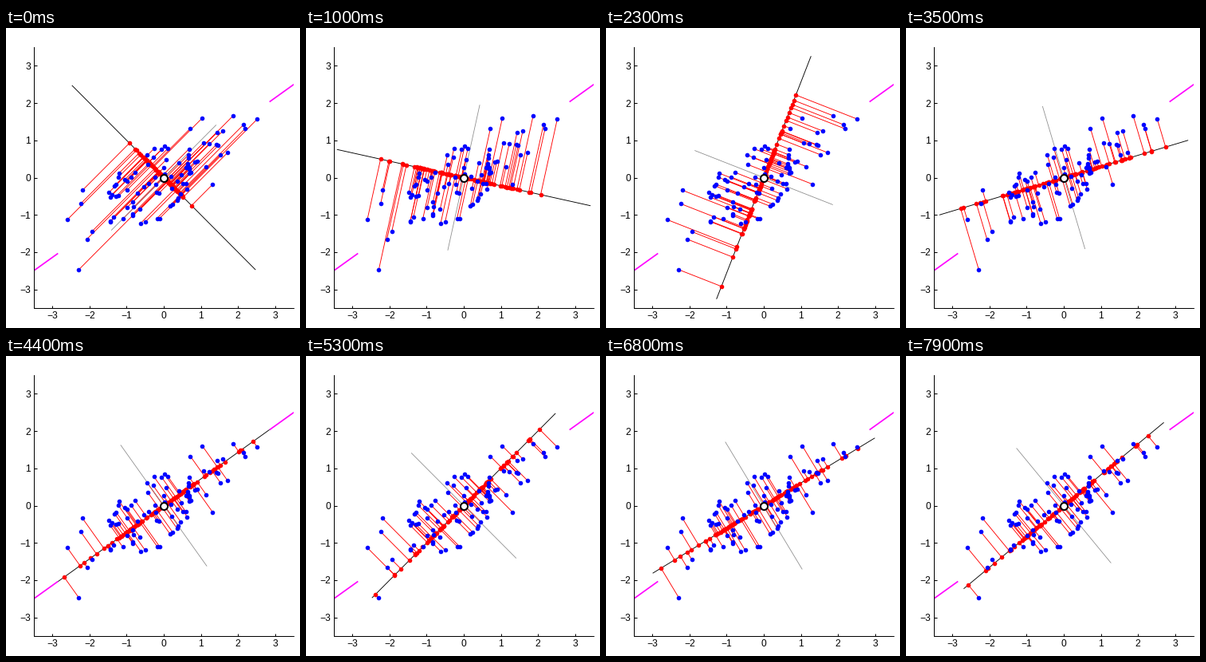
A matplotlib script that plays this animation: 369 by 376 pixels, repeating every 8000 ms.

```python
import numpy as np
import matplotlib.pyplot as plt
from matplotlib.animation import FuncAnimation
from matplotlib.collections import LineCollection

W, H, DPI = 369, 376, 100
FRAMES, STEP_MS = 80, 100
REST, START = 35.5, -45.0      # principal axis and starting angle, degrees
PULL, DAMP = 1.52, 0.93        # spring torque and friction per step
LIM, REACH, NORMAL = 3.5, 3.5, 2.0
PX = 72 / DPI


def unit(deg):
    a = np.radians(deg)
    return np.array([np.cos(a), np.sin(a)])


def turn(v):
    return np.array([-v[1], v[0]])


def cloud(n, along, across, seed=7):
    """Random points in an ellipse on the main axis, denser in the middle."""
    rng = np.random.default_rng(seed)
    radius = rng.uniform(size=n) ** 0.6
    phase = rng.uniform(0, 2 * np.pi, n)
    return (np.outer(along * radius * np.cos(phase), MAIN)
            + np.outer(across * radius * np.sin(phase), turn(MAIN)))


def swing(n):
    """Angles of a damped spring pulling the line onto the main axis."""
    angle, speed, out = START, 0.0, []
    for _ in range(n):
        out.append(angle)
        speed = DAMP * speed - PULL * np.sin(np.radians(2 * (angle - REST)))
        angle += speed
    return out


MAIN = unit(REST)
ANGLES = swing(FRAMES)
OUTLIERS = [(2.52, 1.57), (2.15, 1.42), (2.19, 1.31), (1.59, 1.25),
            (1.87, 1.66), (1.04, 1.60), (1.72, 0.67), (1.32, -0.18),
            (-2.19, -0.34), (-2.24, -0.70), (-2.60, -1.13),
            (-2.07, -1.65), (-1.94, -1.45), (-2.29, -2.47)]
pts = np.vstack([OUTLIERS, cloud(80, 1.9, 0.95)])

fig = plt.figure(figsize=(W / DPI, H / DPI), dpi=DPI, facecolor="white")
ax = fig.add_axes([35 / W, 25 / H, 326 / W, 327 / H])
ticks = range(-3, 4)
ax.set(xlim=(-LIM, LIM), ylim=(-LIM, LIM), xticks=ticks, yticks=ticks)
labels = [str(v).replace("-", "\u2212") for v in ticks]
font = dict(family="Liberation Sans", fontsize=12 * PX)
ax.set_xticklabels(labels, **font)
ax.set_yticklabels(labels, **font)
ax.tick_params(direction="in", length=3.5 * PX, width=PX, pad=4 * PX)
for side in ("left", "bottom"):
    ax.spines[side].set_linewidth(PX)
for side in ("top", "right"):
    ax.spines[side].set_visible(False)


def line(color, z, width=0.9):
    return ax.plot([], [], color=color, lw=width * PX, zorder=z,
                   solid_capstyle="butt")[0]


def dots(color, z, size=5.6, edge=0, face=None):
    return ax.plot([], [], "o", ms=size * PX, mfc=face or color, mec=color,
                   mew=edge * PX, zorder=z)[0]


for sign in (-1, 1):
    line("magenta", 1, 1.7).set_data(*np.outer(sign * MAIN, [REACH, 5]))

links = LineCollection([], colors="red", linewidths=0.9 * PX, zorder=2)
ax.add_collection(links, autolim=False)
normal = line("0.55", 3, 0.8)
axis = line("black", 4)
shadows = dots("red", 5)
dots("blue", 6).set_data(*pts.T)
dots("black", 7, 9, 2, "white").set_data([0], [0])


def draw(i):
    w = unit(ANGLES[i])
    foot = np.outer(pts @ w, w)
    links.set_segments(np.stack([pts, foot], axis=1))
    axis.set_data(*np.outer(w, [-REACH, REACH]))
    normal.set_data(*np.outer(turn(w), [-NORMAL, NORMAL]))
    shadows.set_data(*foot.T)
    return links, axis, normal, shadows


anim = FuncAnimation(fig, draw, frames=FRAMES, interval=STEP_MS,
                     init_func=lambda: draw(0), repeat=True, repeat_delay=0)
plt.show()
```
